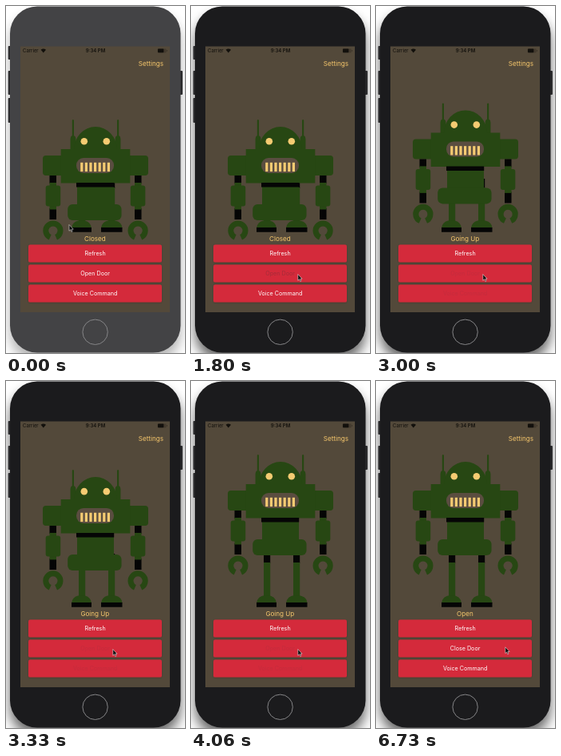
An HTML page for the animation above (6930 ms loop, 224x434 px).

```html
<!DOCTYPE html>
<html lang="en">
<head>
<meta charset="utf-8">
<title>Robot door</title>
<style>
html, body { margin: 0; width: 100%; height: 100%; overflow: hidden; background: #fff; }
svg { display: block; width: 100vw; height: 100vh; }
text { font-family: Inter, Roboto, "Liberation Sans", sans-serif; }
.label { font-size: 8.1px; fill: #f6c76c; }
.title { font-size: 7.15px; fill: #fff; }
.status { font-size: 6px; fill: #12100c; }
.green { fill: #274713; }
.black { fill: #050505; }
.gold { fill: #f5cb72; }
.button { fill: #d42b3b; }
</style>
</head>
<body>
<svg viewBox="0 0 224 434">
  <defs>
    <filter id="blur" x="-20%" y="-20%" width="140%" height="140%">
      <feGaussianBlur stdDeviation="7.5"/>
    </filter>
    <filter id="lift" x="-5%" y="-20%" width="110%" height="150%">
      <feDropShadow dx="0" dy=".6" stdDeviation="1" flood-color="#000" flood-opacity=".22"/>
    </filter>
    <g id="arm">
      <path class="green" d="M76 187H50q-4 0-4 4V208q0 4 4 4H76z"/>
      <path class="black" d="M54.5 212H63v10h-8.5zM54.5 253H63v14h-8.5z"/>
      <path class="green" d="M54.5 221H63V254.5H54.5z"/>
      <rect class="green" x="49.7" y="224.5" width="18.5" height="26" rx="3"/>
      <path d="M55.2 289.3A9.1 9.1 0 1 1 62.6 289.3" fill="none" stroke="#274713" stroke-width="7"/>
      <path class="green" d="M82.8 143q1.1-2 2.2 0V162q2.4 1 2.4 4V180H80.6V166q0-3 2.2-4z"/>
    </g>
  </defs>

  <rect width="224" height="434" fill="#fff"/>
  <rect id="shadow" x="5" y="11" width="213.5" height="433" rx="34" filter="url(#blur)"/>
  <g fill="#2c2c2e">
    <rect x="2.7" y="50" width="4" height="17" rx="1"/>
    <rect x="2.7" y="81" width="4" height="30" rx="1"/>
    <rect x="2.7" y="115" width="4" height="31" rx="1"/>
    <rect x="217" y="81" width="4" height="30" rx="1"/>
  </g>
  <rect id="bezel" x="5" y="0.5" width="213.5" height="433" rx="34"/>
  <circle cx="111.6" cy="407.8" r="15.7" fill="none" stroke="#858587"/>
  <rect x="18" y="50.5" width="187" height="332.5" fill="#53493a"/>

  <g class="status">
    <text x="21" y="58">Carrier</text>
    <text x="112" y="58" text-anchor="middle" font-weight="600">9:34 PM</text>
    <path d="M43.6 54.8q3.2-2.8 6.4 0L46.8 58.6z"/>
    <rect x="189.7" y="53.4" width="10.8" height="5" rx="1" fill-opacity=".25"/>
    <rect x="190" y="53.6" width="7.3" height="4.6" rx=".8"/>
    <rect x="201" y="55" width=".8" height="1.8" fill-opacity=".4"/>
  </g>
  <text class="label" x="197" y="74.8" text-anchor="end">Settings</text>

  <g id="legs">
    <path class="black" d="M91 216H99.2V228H91zM128 216H136.2V228H128z"/>
    <path class="green" d="M91 227H99.2V272H91zM128 227H136.2V272H128z"/>
    <path class="green" d="M82 277.5q1-7 8-9h9q7 2 8 9zM119 277.5q1-7 8-9h10q8 2 8.5 9z"/>
    <path class="black" d="M82 277h25v5.8H82zM119 277h26.5v5.8H119z"/>
  </g>
  <g id="robot">
    <use href="#arm"/>
    <use href="#arm" transform="translate(224) scale(-1 1)"/>
    <path class="green" d="M85 180A27 29 0 0 1 139 180zM68.7 179H155.3V221.5H68.7z"/>
    <circle class="gold" cx="97.8" cy="169.2" r="4.3"/>
    <circle class="gold" cx="125.8" cy="169.2" r="4.3"/>
    <rect x="88" y="190" width="47" height="19" rx="9" fill="#5a4d40"/>
    <g id="teeth" class="gold"></g>
    <path class="green" d="M89 226H135V250H89z"/>
    <path class="black" d="M88 221H135.2V226.5H88z"/>
    <rect class="green" x="77.2" y="248" width="67.3" height="20" rx="6"/>
  </g>

  <text id="state" class="label" x="111.4" y="293.6" text-anchor="middle"></text>
  <g id="buttons" text-anchor="middle"></g>
  <path id="cursor" d="M0 0V7.8L1.8 6.2 3 9 4.2 8.4 3 5.7H5.3Z" fill="#080808" stroke="#fff" stroke-width=".5"/>
</svg>
<script>
const LOOP = 6930, FPS = 15, RISE = 50;
const NS = "http://www.w3.org/2000/svg";
const $ = id => document.getElementById(id);

function add(parent, tag, attrs) {
  const el = document.createElementNS(NS, tag);
  for (const key in attrs) el.setAttribute(key, attrs[key]);
  return parent.appendChild(el);
}

const clamp = v => Math.max(0, Math.min(1, v));
const progress = (t, from, to) => clamp((t - from) / (to - from));
const mix = (a, b, p) => a + (b - a) * p;
const smooth = p => p * p * (3 - 2 * p);

for (let i = 0; i < 7; i++)
  add($("teeth"), "rect", { x: 93.2 + i * 5.6, y: 195.8, width: 3.2, height: 11.3 });

const titles = ["Refresh", "Open Door", "Voice Command"].map((name, i) => {
  const y = 298.6 + i * 25;
  add($("buttons"), "rect", { class: "button", x: 28, y, width: 167, height: 22, rx: 2.2, filter: "url(#lift)" });
  const title = add($("buttons"), "text", { class: "title", x: 111.6, y: y + 13.6 });
  title.textContent = name;
  return title;
});

function render(time) {
  const t = Math.floor((time + 5) * FPS / 1000) * 1000 / FPS;
  const pressed = t >= 1795;
  const moving = t >= 2195 && t < 6195;
  const open = t >= 6195;

  const shade = Math.round(mix(67, 27, progress(t, 600, 1130)));
  $("bezel").setAttribute("fill", `rgb(${shade},${shade},${shade + 2})`);
  $("shadow").setAttribute("opacity", pressed ? 0.6 : 0.3);

  const lift = RISE * progress(t, 2340, 3940);
  $("robot").setAttribute("transform", `translate(0 ${-lift})`);

  $("state").textContent = open ? "Open" : moving ? "Going Up" : "Closed";
  titles[1].textContent = open ? "Close Door" : "Open Door";
  titles[1].style.fill = moving ? "#c52c3d" : pressed && !open ? "#a52c39" : "#fff";
  titles[2].style.fill = moving ? "#c52c3d" : "#fff";

  const reach = smooth(progress(t, 0, 467));
  const slide = progress(t, 5333, 5733);
  const x = mix(79, 133.8, reach) + 28 * slide;
  const y = mix(273.5, 335.5, reach) - 2.7 * slide;
  $("cursor").setAttribute("transform", `translate(${x} ${y})`);
}

const start = performance.now();
function tick() {
  render((performance.now() - start) % LOOP);
  requestAnimationFrame(tick);
}
render(0);
requestAnimationFrame(tick);
</script>
</body>
</html>
```
